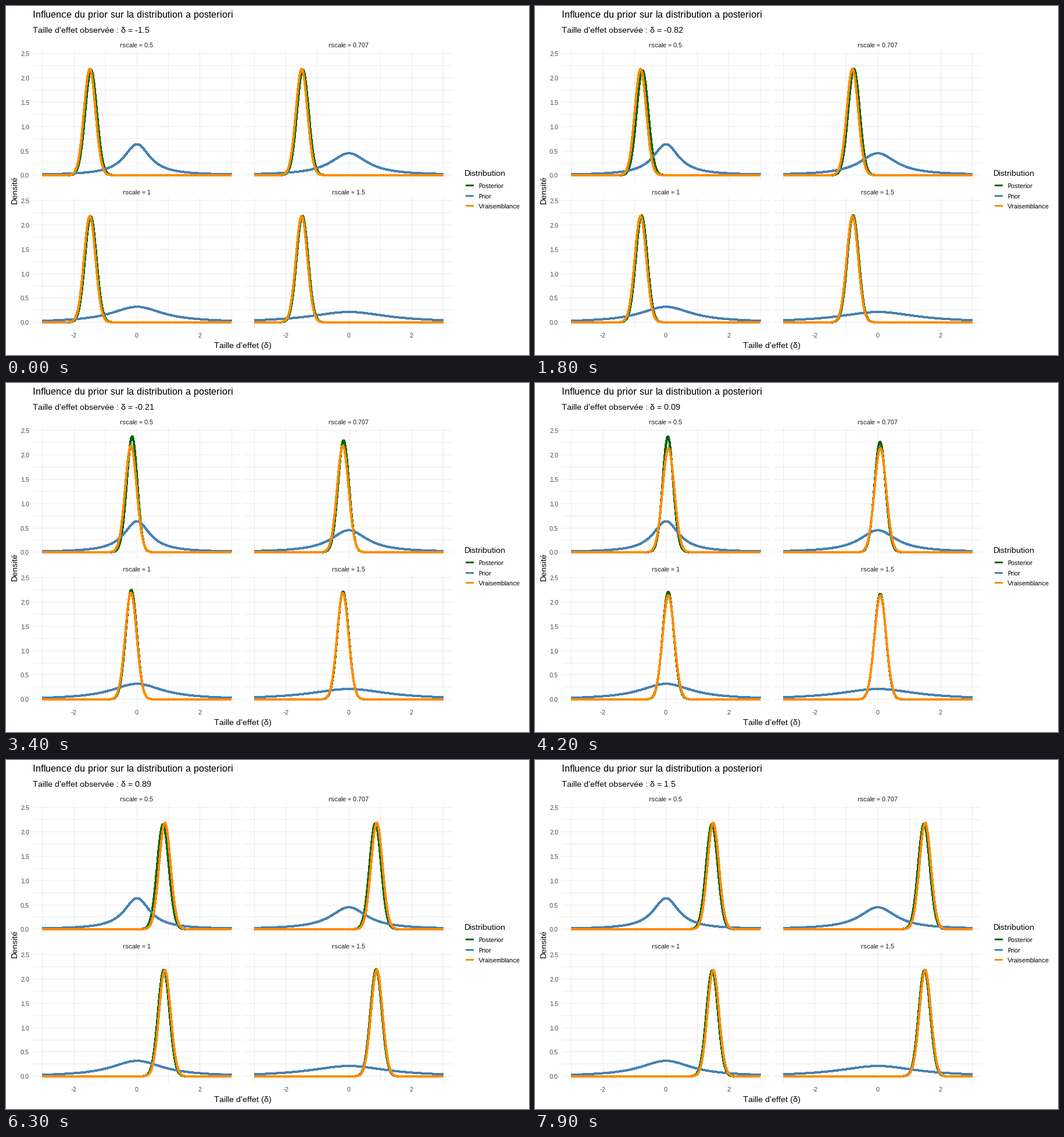
A matplotlib script that plays this animation: 900 px wide and 600 px high, repeating every 8000 ms.

```python
import numpy as np
import matplotlib.pyplot as plt
from matplotlib.animation import FuncAnimation

# 72 dpi makes one point equal one pixel
plt.rcParams.update({
    "font.family": "Liberation Sans",
    "text.hinting": "native",
    "text.hinting_factor": 1,
    "text.kerning_factor": 12,
    "path.simplify": False,
})

WIDTH, HEIGHT, DPI = 900, 600, 72
N_FRAMES, INTERVAL = 80, 100
N_STATES = 40
SE = 1 / np.sqrt(30)

X_UNIT, Y_UNIT = 54.2, 83.6
X_ORIGINS = (225.4, 590.1)
Y_ORIGINS = (290.8, 543.8)
HALF_WIDTH, ABOVE, BELOW = 3.3 * X_UNIT, 213.5, 10.4
KEY_TOP, KEY_STEP = 308.9, 17.28

GRID, TICK, STRIP = "#EBEBEB", "#4D4D4D", "#1A1A1A"
COLORS = {"Posterior": "#006400", "Prior": "#4682B4", "Vraisemblance": "#FF8C00"}
SCALES = (0.5, 0.707, 1, 1.5)

x = np.linspace(-3, 3, 500)
dx = x[1] - x[0]
deltas = np.linspace(-1.5, 1.5, N_STATES)
state_frames = np.round(np.linspace(0, N_FRAMES - 1, N_STATES))


def prior(scale):
    return 1 / (np.pi * scale * (1 + (x / scale) ** 2))


def likelihood(delta):
    return np.exp(-0.5 * ((x - delta) / SE) ** 2) / (SE * np.sqrt(2 * np.pi))


def posterior(delta, scale):
    density = prior(scale) * likelihood(delta)
    return density / (density.sum() * dx)


def tween(frame, density):
    """Blend the densities of the two states around a frame."""
    k = min(np.searchsorted(state_frames, frame, side="right") - 1, N_STATES - 2)
    start, end = state_frames[k], state_frames[k + 1]
    t = (frame - start) / (end - start)
    return (1 - t) * density(deltas[k]) + t * density(deltas[k + 1])


def pixel(v):
    return np.floor(v) + 0.5


fig = plt.figure(figsize=(WIDTH / DPI, HEIGHT / DPI), dpi=DPI, facecolor="white")
ax = fig.add_axes([0, 0, 1, 1])
ax.set(xlim=(0, WIDTH), ylim=(HEIGHT, 0))
ax.axis("off")


def stroke(xs, ys, color, width, zorder):
    return ax.plot(xs, ys, color=color, lw=width, antialiased=False, snap=False,
                   solid_capstyle="butt", solid_joinstyle="round", zorder=zorder)[0]


def label(px, py, text, size, color="black", ha="left", **kw):
    return ax.text(px, py, text, fontsize=size, color=color, ha=ha,
                   va="baseline", zorder=5, **kw)


def centered(px, py, text, size, color="black"):
    # half of the side bearings, which the ink width leaves out
    return label(px - 0.7, py, text, size, color, "center")


def draw_panel(x0, y0, scale):
    left, right = np.floor([x0 - HALF_WIDTH, x0 + HALF_WIDTH])
    top, bottom = np.floor([y0 - ABOVE, y0 + BELOW])
    for v in range(-3, 4):
        px = pixel(x0 + v * X_UNIT)
        stroke([px, px], [top, bottom], GRID, 1, 1)
    for v in np.arange(0, 2.51, 0.25):
        py = pixel(y0 - v * Y_UNIT)
        stroke([left, right], [py, py], GRID, 1, 1)
    centered(x0, np.floor(y0) - 219, f"rscale = {scale:g}", 11, STRIP)

    px = x0 + x * X_UNIT
    lines = {name: stroke(px, np.full_like(px, y0), color, 3, z)
             for z, (name, color) in enumerate(COLORS.items(), 2)}
    lines["Prior"].set_ydata(y0 - prior(scale) * Y_UNIT)
    return y0, scale, lines


origins = [(x0, y0) for y0 in Y_ORIGINS for x0 in X_ORIGINS]
panels = [draw_panel(x0, y0, scale) for (x0, y0), scale in zip(origins, SCALES)]

for y0 in Y_ORIGINS:
    for v in np.arange(0, 2.6, 0.5):
        label(25, np.floor(y0 - v * Y_UNIT + 5), f"{v:.1f}", 11, TICK)
for x0 in X_ORIGINS:
    for v in (-2, 0, 2):
        centered(x0 + v * X_UNIT, 570, str(v), 11, TICK)

label(46, 20, "Influence du prior sur la distribution a posteriori", 17)
subtitle = label(46, 46, "", 14)
centered(407.7, 588, "Taille d'effet (δ)", 14)
label(19, 315.5, "Densité", 14, ha="center", rotation=90, rotation_mode="anchor")

label(789, 292, "Distribution", 14)
for i, (name, color) in enumerate(COLORS.items()):
    key_y = KEY_TOP + KEY_STEP * i
    stroke([791, 805], [pixel(key_y)] * 2, color, 3, 2)
    label(813, np.floor(key_y + 5), name, 11)


def update(frame):
    delta = -1.5 + 3 * frame / (N_FRAMES - 1)
    subtitle.set_text(f"Taille d'effet observée : δ = {round(delta, 2):g}")
    lik = tween(frame, likelihood)
    changed = [subtitle]
    for y0, scale, lines in panels:
        post = tween(frame, lambda d: posterior(d, scale))
        lines["Posterior"].set_ydata(y0 - post * Y_UNIT)
        lines["Vraisemblance"].set_ydata(y0 - lik * Y_UNIT)
        changed += lines.values()
    return changed


anim = FuncAnimation(fig, update, frames=N_FRAMES, interval=INTERVAL, repeat=True)
plt.show()
```
